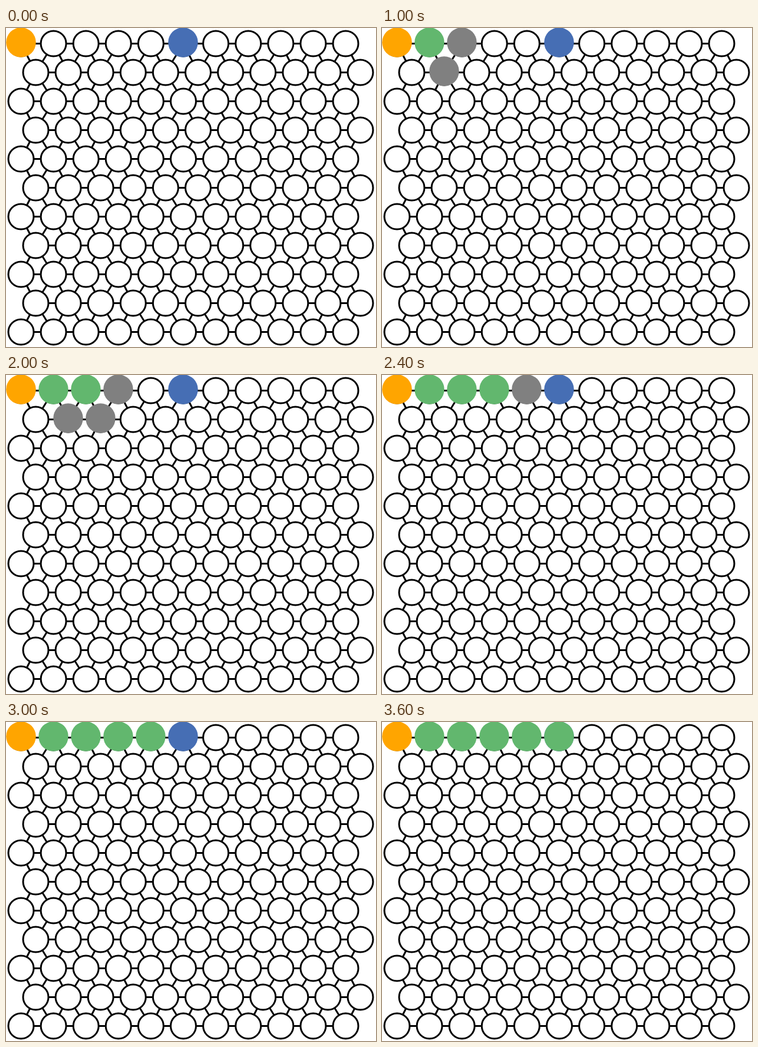
An HTML page with a canvas that plays this animation: 628 by 542 pixels, repeating every 3.8 s.

```html
<!DOCTYPE html>
<html lang="en">
<head>
<meta charset="utf-8">
<title>Path search on a hexagonal grid</title>
<style>
  html, body { margin: 0; width: 100%; height: 100%; overflow: hidden; background: #fff; }
  canvas { display: block; }
</style>
</head>
<body>
<canvas id="stage" width="628" height="542"></canvas>
<script>
const ctx = document.getElementById('stage').getContext('2d');
const SIZE = 11, STEP_MS = 200, LOOP_MS = 3800;
const ORANGE = '#ffa500', BLUE = '#466eb4', GREEN = '#62b76e', GRAY = '#808080';
const GOAL = 5;

// Cells [column, row] probed before each further cell joins the path.
const probes = [
  [[1, 0], [0, 1]],
  [[2, 0], [1, 1], [0, 1]],
  [[3, 0], [2, 1], [1, 1]],
  [[4, 0], [3, 1], [2, 1]],
  [[4, 1], [3, 1]]
];

const nodeX = (col, row) => 25.5 + 55.1 * col + 25 * (row % 2);
const nodeY = row => 26.5 + 49 * row;

function drawEdge(col, row, col2, row2) {
  if (col2 < 0 || col2 >= SIZE || row2 >= SIZE) return;
  ctx.beginPath();
  ctx.moveTo(nodeX(col, row), nodeY(row));
  ctx.lineTo(nodeX(col2, row2), nodeY(row2));
  ctx.stroke();
}

function eachCell(draw) {
  for (let row = 0; row < SIZE; row++)
    for (let col = 0; col < SIZE; col++) draw(col, row);
}

function drawGrid() {
  ctx.fillStyle = '#fff';
  ctx.fillRect(0, 0, 628, 542);
  ctx.strokeStyle = '#000';
  ctx.lineWidth = 3;
  eachCell((col, row) => {
    const left = col - 1 + row % 2;
    drawEdge(col, row, col + 1, row);
    drawEdge(col, row, left, row + 1);
    drawEdge(col, row, left + 1, row + 1);
  });
  eachCell((col, row) => {
    ctx.beginPath();
    ctx.arc(nodeX(col, row), nodeY(row), 21.5, 0, 2 * Math.PI);
    ctx.fill();
    ctx.stroke();
  });
}

function drawDisc(col, row, color) {
  ctx.fillStyle = color;
  ctx.beginPath();
  ctx.arc(25.5 + 55 * col + 25 * (row % 2), 24.5 + 49 * row, 25.3, 0, 2 * Math.PI);
  ctx.fill();
}

function render(time) {
  let step = Math.floor(time % LOOP_MS / STEP_MS);
  let found = 0;
  while (found < probes.length && step > probes[found].length) {
    step -= probes[found].length + 1;
    found++;
  }
  drawGrid();
  drawDisc(0, 0, ORANGE);
  drawDisc(GOAL, 0, BLUE);
  for (let col = 1; col <= found; col++) drawDisc(col, 0, GREEN);
  for (const [col, row] of (probes[found] || []).slice(0, step)) drawDisc(col, row, GRAY);
}

function tick() {
  render(performance.now());
  requestAnimationFrame(tick);
}
tick();
</script>
</body>
</html>
```
